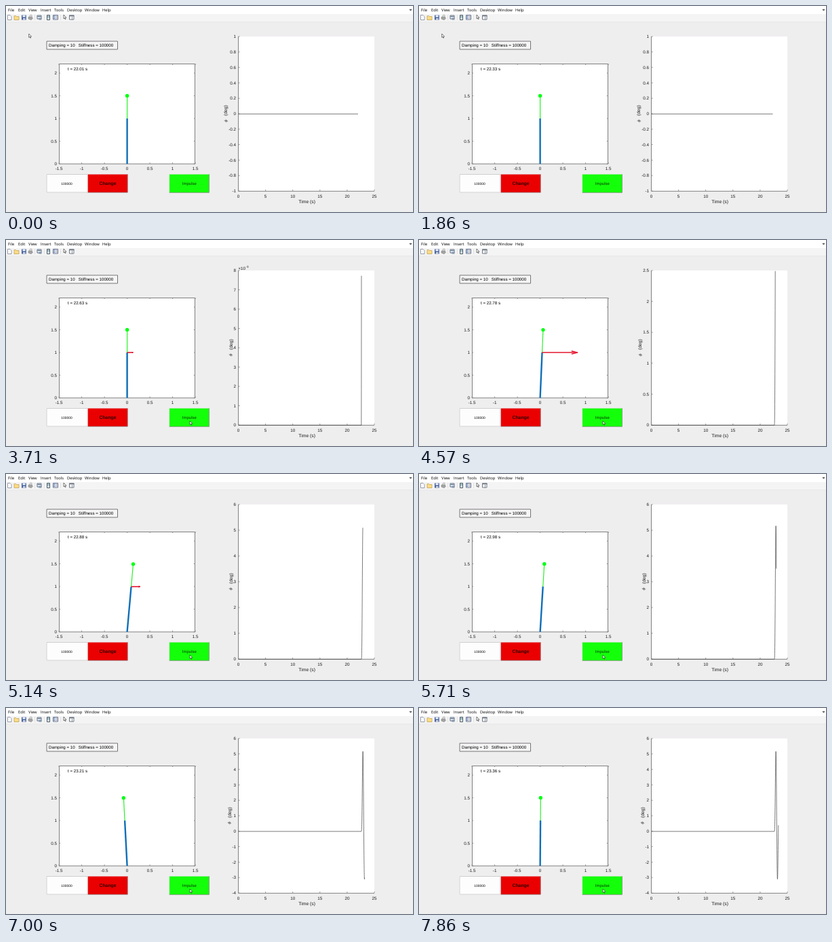
An HTML page with a canvas for the animation above (8 s loop, 600 px wide and 304 px high).

```html
<!DOCTYPE html>
<html lang="en">
<head>
<meta charset="utf-8">
<title>Pendulum impulse response</title>
<style>
html, body { margin: 0; width: 100%; height: 100%; overflow: hidden; background: #efeeef; }
canvas { display: block; width: 600px; height: 304px; }
</style>
</head>
<body>
<canvas id="stage"></canvas>
<script>
const W = 600, H = 304, LOOP = 8000, FPS = 7, LAST = 55;
const canvas = document.getElementById('stage');
const ctx = canvas.getContext('2d');
const dpr = window.devicePixelRatio || 1;
canvas.width = W * dpr;
canvas.height = H * dpr;
ctx.textRendering = 'geometricPrecision';
ctx.lineJoin = 'round';

const SANS = '"Liberation Sans", Arial, sans-serif';
const MENU = '"Open Sans", sans-serif';
const INK = '#1c1c1c', AXIS = '#808080';

// Simulated clock: [step, seconds]
const clock = [[0, 22.01], [13, 22.33], [26, 22.63], [32, 22.78], [36, 22.88], [44, 23.08], [55, 23.36]];
const PUSH = 22.6154, OMEGA = 10.96, PUSH_END = PUSH + Math.PI / OMEGA;

function simTime(n) {
  let i = 1;
  while (i < clock.length - 1 && n > clock[i][0]) i++;
  const [a, ta] = clock[i - 1], [b, tb] = clock[i];
  return Math.round((ta + (tb - ta) * (n - a) / (b - a)) * 100) / 100;
}

// Lean angle in degrees: half-sine push near resonance, then free decay
function angle(t) {
  if (t <= PUSH) return 0;
  if (t < PUSH_END) {
    const s = t - PUSH, u = OMEGA * s;
    return 1.997 * Math.exp(-0.678 * s) * (Math.sin(u) - u * Math.cos(u)) + 0.037 * u * Math.exp(-u);
  }
  const d = t - 23.06;
  return -3.94 * Math.exp(-1.8 * d) * Math.sin(11.05 * d);
}

function force(t) {
  return t > PUSH && t < PUSH_END ? 0.8 * Math.sin(OMEGA * (t - PUSH)) : 0;
}

function rect(x, y, w, h, fill, stroke) {
  if (fill) { ctx.fillStyle = fill; ctx.fillRect(x, y, w, h); }
  if (stroke) {
    ctx.strokeStyle = stroke;
    ctx.lineWidth = 1;
    ctx.strokeRect(x + 0.5, y + 0.5, w - 1, h - 1);
  }
}

function path(points, color, width, fill) {
  ctx.beginPath();
  points.forEach(([x, y]) => ctx.lineTo(x, y));
  if (fill) { ctx.closePath(); ctx.fillStyle = fill; ctx.fill(); }
  ctx.strokeStyle = color;
  ctx.lineWidth = width;
  ctx.stroke();
}

// y is the vertical centre of the digits
function text(str, x, y, size = 6.3, align = 'left', color = INK, family = SANS, style = '') {
  ctx.font = style + ' ' + size + 'px ' + family;
  ctx.textAlign = align;
  ctx.fillStyle = color;
  ctx.fillText(str, x, y + size * 0.36);
}

function drawMenu() {
  rect(0, 0, W, 12, '#ffffff');
  rect(0, 12, W, 11.5, '#f4f4f4');
  rect(0, 23.5, W, 0.7, '#e4e4e4');
  const items = [['File', 3], ['Edit', 18], ['View', 33], ['Insert', 51], ['Tools', 71],
    ['Desktop', 90], ['Window', 116], ['Help', 142]];
  for (const [name, x] of items) text(name, x, 5.8, 5.8, 'left', '#000', MENU);
  path([[594.8, 5], [598.2, 5], [596.5, 7]], '#555', 0.6, '#555');
}

function drawToolbar() {
  for (const x of [42, 56, 80]) rect(x, 13, 0.8, 8, '#dedede');
  // new, open, save, print
  path([[2.5, 13.5], [6, 13.5], [8, 15.5], [8, 20.5], [2.5, 20.5]], '#7c8496', 0.8, '#fff');
  path([[12, 20.5], [12, 14.5], [14.5, 14.5], [15.5, 15.5], [19, 15.5], [19, 20.5]], '#c09a4a', 0.7, '#f9dc86');
  rect(23, 13.5, 6.8, 7, '#4a64a0');
  rect(24.5, 13.5, 4, 3, '#e4ecf6');
  rect(25, 18, 3.5, 2.5, '#cfd6df');
  path([[34.5, 16], [35.5, 13.3], [38, 13.3], [38, 16]], '#999', 0.7, '#f0f0f0');
  path([[33, 16.3], [38.5, 16.3], [39.3, 18.5], [37, 20.5], [33, 19]], '#8a8a8a', 0.7, '#a4a4a4');
  // preview, page tools, legend
  rect(45.5, 13.5, 7, 6, '#e2e9f2', '#66758a');
  rect(46.5, 15, 5, 1, '#66758a');
  rect(48.5, 17.5, 4, 3, '#8797aa');
  rect(60, 13, 5, 8, '#e3eef0', '#4f5f6a');
  rect(61, 14.5, 3, 2.5, '#8fb5bd');
  rect(69, 13, 8, 7.5, '#f1f4f9', '#6a7590');
  for (const y of [14.5, 17]) {
    rect(70.5, y, 1.6, 1.6, '#3a63ad');
    rect(73, y + 0.3, 2.7, 1, '#888');
  }
  pointer(85, 13, 0.95);
  rect(93, 13.5, 7.5, 7, '#f7f7f7', '#727a86');
  rect(93, 13.5, 7.5, 1.8, '#727a86');
  rect(97, 15.5, 0.9, 5, '#8c949e');
}

function pointer(x, y, k = 0.9) {
  const shape = [[0, 0], [0, 6], [1.4, 4.8], [2.4, 7], [3.3, 6.6], [2.4, 4.5], [4.2, 4.4]];
  path(shape.map(([a, b]) => [x + a * k, y + b * k]), '#222', 0.6, '#fff');
}

// Raised button: lit top and left edges, shaded bottom and right
function button(x, y, w, h, fill) {
  rect(x, y, w, h, fill);
  path([[x, y + h], [x, y], [x + w, y]], '#e6e2e2', 0.6);
  path([[x, y + h], [x + w, y + h], [x + w, y]], '#858585', 0.7);
}

function drawControls() {
  rect(59.5, 51.5, 105.5, 13, '#f5f5f5', '#747474');
  text('Damping = 10\u00a0\u00a0\u00a0Stiffness = 100000', 63, 58, 6.2, 'left', '#000');

  rect(59.5, 248, 61, 27.5, '#fdfdfd', '#cfcfcf');
  text('100000', 89.5, 262, 4.9, 'center', '#000');

  button(120.5, 248.2, 58.8, 27, '#ea0000');
  text('Change', 150, 262, 6.8, 'center', '#300000', SANS, 'bold');

  button(240.7, 248.2, 58.8, 27.2, '#14ff0a');
  text('Impulse', 270.3, 262, 6, 'center', '#053805');
}

function drawPendulum(t) {
  const x0 = 178.6, y0 = 233, unit = 67;
  const px = v => x0 + v * unit, py = v => y0 - v * unit;
  rect(78, 85, 201, 148, '#fff');
  rect(78, 85, 201, 148.5, null, AXIS);
  for (let v = -1.5; v <= 1.5; v += 0.5) {
    path([[px(v), 233], [px(v), 230.8]], AXIS, 0.8);
    path([[px(v), 85], [px(v), 87.2]], AXIS, 0.8);
    text(String(v), px(v), 240, 6.3, 'center');
  }
  for (let v = 0; v <= 2; v += 0.5) {
    path([[78, py(v)], [80.2, py(v)]], AXIS, 0.8);
    path([[279, py(v)], [276.8, py(v)]], AXIS, 0.8);
    text(String(v), 75, py(v), 6.3, 'right');
  }
  text('t = ' + t.toFixed(2) + ' s', 91, 92.7, 6.2, 'left', '#000');

  const a = angle(t) * Math.PI / 180;
  const at = r => [px(r * Math.sin(a)), py(r * Math.cos(a))];
  const tip = at(1), top = at(1.5);
  path([tip, top], '#2cf02c', 1.2);
  ctx.beginPath();
  ctx.arc(top[0], top[1], 2.7, 0, 7);
  ctx.fillStyle = '#00ff14';
  ctx.fill();
  path([at(0), tip], '#0f6fb8', 2.4);

  const len = force(t) * unit;
  if (len > 0) {
    const [x, y] = tip, end = x + len, back = len * 0.17, half = len * 0.045;
    path([[x, y], [end, y]], '#e3142c', 1.6);
    path([[end - back, y - half], [end, y], [end - back, y + half]], '#e3142c', 1.4);
  }
}

// Tick step from 1-2-5 decades with at most ten intervals
function limits(lo, hi) {
  if (lo === hi) return [-5, 5, 0.2];
  for (let e = -6; ; e++) {
    for (const m of [1, 2, 5]) {
      const step = m * 10 ** e;
      const a = Math.floor(lo / step), b = Math.ceil(hi / step);
      if (b - a <= 10) return [a, b, step];
    }
  }
}

function drawGraph(t) {
  const L = 342.5, R = 543, T = 45, B = 273;
  const px = s => L + s * (R - L) / 25;
  const samples = [[0, 0], [Math.min(t, 22.61), 0]];
  for (let i = 2262; i <= Math.round(t * 100); i++) samples.push([i / 100, angle(i / 100)]);
  const values = samples.map(s => s[1]);
  const [a, b, step] = limits(Math.min(...values), Math.max(...values));
  const py = v => B - (v / step - a) * (B - T) / (b - a);

  rect(342, T, R - 342, B - T, '#fff');
  path([[L, T], [L, B + 0.3], [R, B + 0.3]], AXIS, 1);
  for (let s = 0; s <= 25; s += 5) {
    path([[px(s), B], [px(s), B - 2.2]], AXIS, 0.8);
    text(String(s), px(s), 281, 6.3, 'center');
  }
  const tiny = b * step < 0.01;
  let widest = 0;
  for (let i = a; i <= b; i++) {
    const y = py(i * step), label = String(+(i * step * (tiny ? 1000 : 1)).toFixed(4));
    path([[L, y], [L + 2.2, y]], AXIS, 0.8);
    text(label, 339, y, 6.3, 'right');
    widest = Math.max(widest, ctx.measureText(label).width);
  }
  if (tiny) {
    text('×10', 342.5, 41.5, 6.2);
    text('-3', 353.5, 39, 4.6);
  }
  path(samples.map(([s, v]) => [px(s), py(v) + 0.3]), '#444', 0.7);

  text('Time (s)', 443.7, 289, 6.8, 'center');
  // The axis title keeps clear of the widest tick label
  ctx.save();
  ctx.translate(334.7 - widest, 162);
  ctx.rotate(-Math.PI / 2);
  text('(deg)', 0, 0, 6.8);
  text('\u03d5', -9.5, 0, 5.8, 'left', '#333', '"DejaVu Serif", serif', 'italic');
  ctx.restore();
}

// Pointer swings down past the window edge and up onto the button
function drawPointer(n) {
  const u = Math.min(1, Math.max(0, (n - 17) / 6)), v = 1 - u;
  const bend = (p, q, r) => v * v * p + 2 * u * v * q + u * u * r;
  pointer(bend(33.7, 170, 271), bend(41, 412, 267));
}

function draw(ms) {
  const n = Math.min(LAST, Math.floor((ms + 5) * FPS / 1000));
  const t = simTime(n);
  ctx.setTransform(dpr, 0, 0, dpr, 0, 0);
  rect(0, 0, W, H, '#efeeef');
  drawMenu();
  drawToolbar();
  drawControls();
  drawPendulum(t);
  drawGraph(t);
  drawPointer(n);
}

const start = performance.now();
function loop() {
  draw((performance.now() - start) % LOOP);
  requestAnimationFrame(loop);
}
loop();
</script>
</body>
</html>
```
